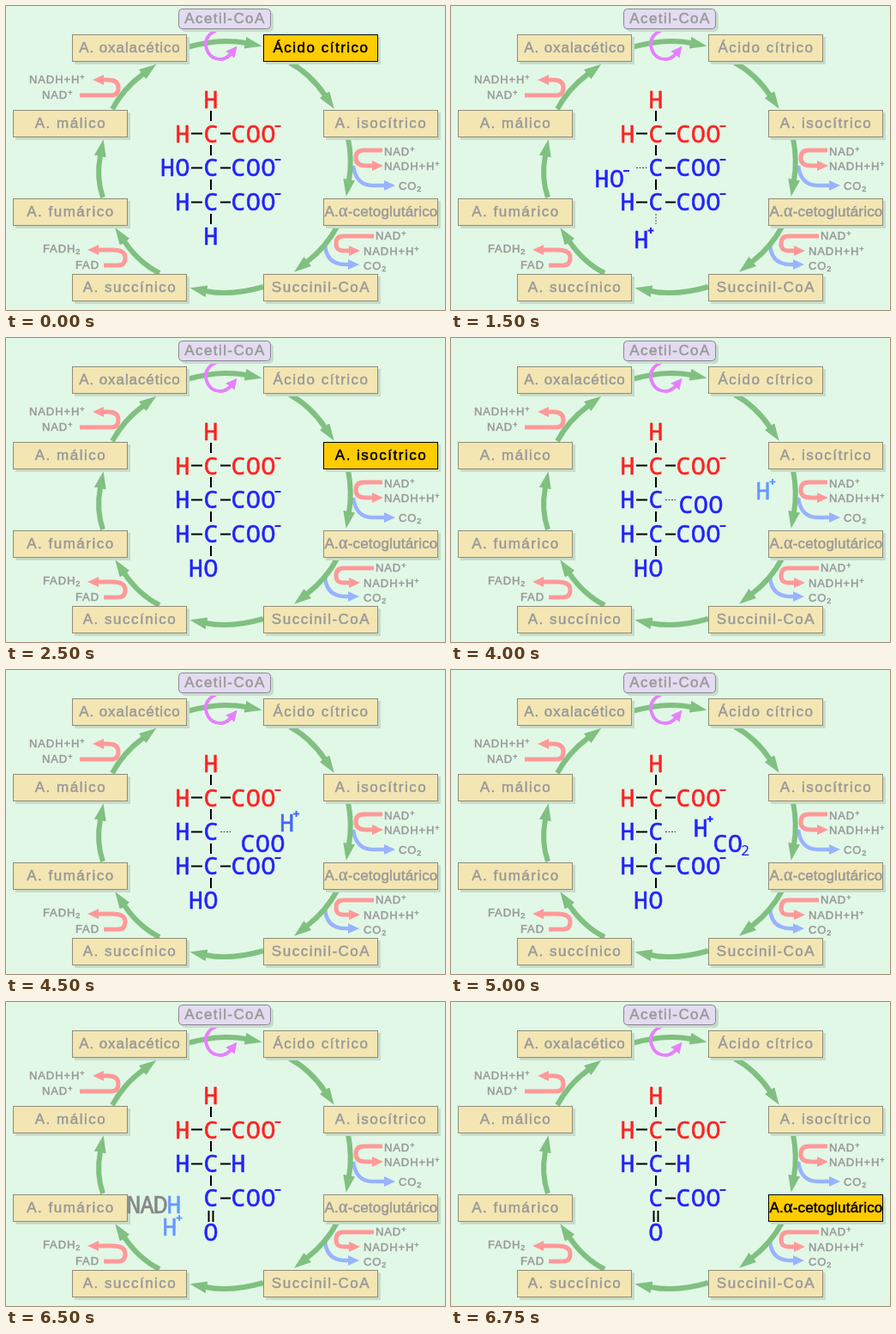
An HTML page that plays this animation: 512 by 354 pixels, repeating every 8000 ms.

```html
<!DOCTYPE html>
<html lang="es">
<head>
<meta charset="utf-8">
<title>Ciclo del ácido cítrico</title>
<style>
  html, body { margin: 0; height: 100%; overflow: hidden; background: #e1f8e7; }
  svg { display: block; width: 512px; height: 354px; }
  .label { font: 17px "Liberation Sans", Arial, sans-serif; text-anchor: middle; }
  .small { font: 13px "Liberation Sans", Arial, sans-serif; letter-spacing: .9px; }
  .label, .small { fill: #999; stroke: #999; stroke-width: .5; }
  .box rect { fill: #f3e6b3; stroke: #8f8c78; }
  .box .shadow, .shadow { fill: #c8dccb; stroke: none; }
  .box.on .face { fill: #fc0; stroke: #000; }
  .box.on text { fill: #000; stroke: #000; }
  .atom { font: 28px "Noto Sans Mono", monospace; stroke-width: .6; }
  .arrow { fill: none; }
</style>
</head>
<body>
<svg viewBox="0 0 512 354">
  <defs id="heads"></defs>
  <g id="arrows"></g>
  <g id="boxes"></g>
  <g id="notes"></g>
  <g id="molecule"></g>
</svg>
<script>
const $ = id => document.getElementById(id);
const RED = '#f22', BLUE = '#22f', BLACK = '#000';

// Cycle arrows: colour, line width, head length, head width, paths
const arrowSets = [
  ['#99b3ff', 4.5, 13, 12, ['M405 186Q408 209 428 209H442', 'M372 275Q372 301 396 301H400']],
  ['#80c080', 6, 20, 14, [
    'M211 48Q250 37 280 43', 'M331 66Q355 79 372 104', 'M399 154Q404 180 400 203',
    'M386 257Q374 280 351 298', 'M300 327Q262 338 233 332', 'M179 311Q155 299 138 274',
    'M113 223Q105 200 110 174', 'M124 120Q137 96 160 79']],
  ['#ff9999', 5, 13, 12, [
    'M86 104H123Q131 104 131 95T119 86H113', 'M114 302H131Q139 302 139 293T124 284H107',
    'M439 168H417Q408 168 408 177T420 186H428', 'M429 268H393Q385 268 385 277T396 285H401']],
  ['#e680ff', 4, 13, 13, ['M246 28Q232 34 233 46Q236 62 251 62Q258 61 262 56']]
];
arrowSets.forEach(([color, width, size, breadth, paths], i) => {
  $('heads').innerHTML += `<marker id="head${i}" markerUnits="userSpaceOnUse" markerWidth="${size}"
    markerHeight="${breadth}" refX="1" refY="${breadth / 2}" orient="auto">
    <path d="M0 0L${size} ${breadth / 2}L0 ${breadth}Z" fill="${color}"/></marker>`;
  $('arrows').innerHTML += paths.map(d => `<path class="arrow" d="${d}" stroke="${color}"
    stroke-width="${width}" marker-end="url(#head${i})"/>`).join('');
});

// Compounds: left, top, name, letter spacing
const compounds = [
  [300, 33, 'Ácido cítrico'], [370, 121, 'A. isocítrico'],
  [370, 224, 'A.<tspan font-family="Liberation Serif, serif" font-size="20">α</tspan>-cetoglutárico', .2],
  [300, 312, 'Succinil-CoA'], [77, 312, 'A. succínico'], [8, 224, 'A. fumárico'],
  [8, 121, 'A. málico'], [77, 33, 'A. oxalacético', .9]
];
$('boxes').innerHTML = compounds.map(([x, y, name, spacing = 1.5]) => `<g class="box">
  <rect class="shadow" x="${x + 3}" y="${y + 3}" width="134" height="32"/>
  <rect class="face" x="${x + .5}" y="${y + .5}" width="133" height="31"/>
  <text class="label" x="${x + 67.5}" y="${y + 20.5}" letter-spacing="${spacing}">${name}</text></g>`).join('') +
  `<rect class="shadow" x="204" y="6" width="108" height="24" rx="5"/>
  <rect x="201.5" y="3.5" width="107" height="23" rx="4" fill="#e3dbef" stroke="#8d8598"/>
  <text class="label" x="255.5" y="20" letter-spacing="1.4">Acetil-CoA</text>`;

// Cofactors: ^ raises and _ lowers the next character
const notes = [
  [27, 90, 'NADH+H^+'], [42, 108, 'NAD^+'], [43, 287, 'FADH_2'], [81, 306, 'FAD'],
  [441, 174, 'NAD^+'], [441, 191, 'NADH+H^+'], [458, 214, 'CO_2'],
  [431, 272, 'NAD^+'], [417, 290, 'NADH+H^+'], [417, 307, 'CO_2']
];
$('notes').innerHTML = notes.map(([x, y, s]) => `<text class="small" x="${x}" y="${y}">${
  s.replace(/([\^_])(.)/, (_, shift, c) =>
    `<tspan dy="${shift === '^' ? -4 : 2}" font-size="9">${c}</tspan>`)}</text>`).join('');

// x is the centre of the first letter, y the baseline
function atoms(s, x, y, color = BLUE, charge = '', pitch = 17.5) {
  const cx = x + s.length * pitch - 10;
  const sign = { '-': `${y - 19}h7`, '+': `${y - 20.5}h7m-3.5 -3.5v7` }[charge];
  return `<text class="atom" x="${x - 8.4}" y="${y}" fill="${color}" stroke="${color}"
    letter-spacing="${pitch - 16.8}">${s}</text>` +
    (sign ? `<path d="M${cx} ${sign}" stroke="${color}" stroke-width="2"/>` : '');
}
const bond = (d, dotted) => `<path d="M${d}" stroke="${dotted ? '#444' : BLACK}"
  stroke-width="${dotted ? 1 : 2}" ${dotted ? 'stroke-dasharray="2 1.5"' : ''}/>`;
const left = (y, dotted) => bond(`216 ${y}h13`, dotted);
const right = (y, dotted) => bond(`250 ${y}h12`, dotted);
const carbonDioxide = (x, y, color) => atoms('CO', x, y, color) +
  `<text class="atom" x="${x + 24}" y="${y + 4}" fill="${color}" style="font-size:17px">2</text>`;

// Start of each pose in ms
const starts = [0, 1500, 1750, 2000, 2250, 2500, 4000, 4250, 4500, 4750,
                5000, 5250, 5500, 5750, 6000, 6250, 6500, 6750];
const hydroxyl = [[176, 211], [166, 230], [166, 254], [184, 273]];
const proton = [[222, 282], [204, 278], [199, 241], [194, 214]];
const carboxyl = [[274, 204], [278, 208], [282, 212], [292, 213]];
const protonTint = ['#69f', '#58f', '#46f', '#34f', BLUE];
const carrier = [[123, 207], [141, 222], [159, 237], [159, 237], [155, 245], [149, 246]];
const carrierTint = ['#888', '#444', BLACK, BLACK, BLACK, '#888'];

function molecule(p) {
  const swap = p >= 1 && p <= 4, leaving = p >= 6 && p <= 10;
  let out = atoms('H', 239, 119, RED) + atoms('H', 206, 159, RED) + atoms('C', 239, 159, RED) +
    atoms('COO', 271, 159, RED, '-') + atoms('C', 239, 198) + atoms('C', 239, 238) +
    atoms('COO', 271, 238, BLUE, '-') +
    bond('239 122v12') + bond('239 162v12') + bond('239 202v12') +
    left(148.5) + right(148.5) + right(228.5) + left(188.5, swap) + right(188.5, leaving);

  // Second carbon
  if (!swap) out += p ? atoms('H', 206, 198) : atoms('HO', 188.5, 198);
  if (p < 6) out += atoms('COO', 271, 198, BLUE, '-');
  if (p > 10) out += atoms('H', 271, 198);

  // Third carbon
  if (p < 15) out += atoms('H', 206, 238) + left(228.5, p === 14);
  if (p < 15) out += bond('239 242v12', swap);
  else out += bond('236.5 243v13') + bond('241.5 243v13', p === 15);
  if (!p) out += atoms('H', 239, 278);
  else if (p > 13) out += atoms('O', 239, 278);
  else if (!swap) out += atoms('HO', 221.5, 278);

  // Moving groups
  if (swap) out += atoms('HO', ...hydroxyl[p - 1], BLUE, '-') + atoms('H', ...proton[p - 1], BLUE, '+');
  if (leaving) {
    const k = p - 6;
    out += atoms('H', 364 - 18.2 * k, k < 4 ? 188 : 194, protonTint[k], '+');
    out += k < 4 ? atoms('COO', ...carboxyl[k]) : carbonDioxide(314, 212, BLUE);
  }
  if (p === 11) out += carbonDioxide(329, 212, '#69f');
  if (p >= 11 && p <= 16) {
    const k = p - 11, [x, y] = carrier[k];
    out += atoms('NAD', x, y, carrierTint[k], '', 15.6);
    if (k > 3) out += atoms('H', x + 47, y, k > 4 ? '#69f' : BLUE);
  }
  if (p >= 14 && p <= 16) {
    const k = p - 14;
    out += atoms('H', 203 - 6 * k, k ? 272 : 278, k > 1 ? '#69f' : BLUE, '+');
    if (!k) out += bond('217 267.5h11', true);
  }
  return out;
}

const boxes = document.querySelectorAll('.box');
const activeBox = { 0: 0, 5: 1, 17: 2 };
let shown = -1;
function tick() {
  const t = performance.now() % 8000;
  const pose = starts.filter(s => s <= t).length - 1;
  if (pose !== shown) {
    shown = pose;
    $('molecule').innerHTML = molecule(pose);
    boxes.forEach((box, i) => box.classList.toggle('on', activeBox[pose] === i));
  }
  requestAnimationFrame(tick);
}
tick();
</script>
</body>
</html>
```
